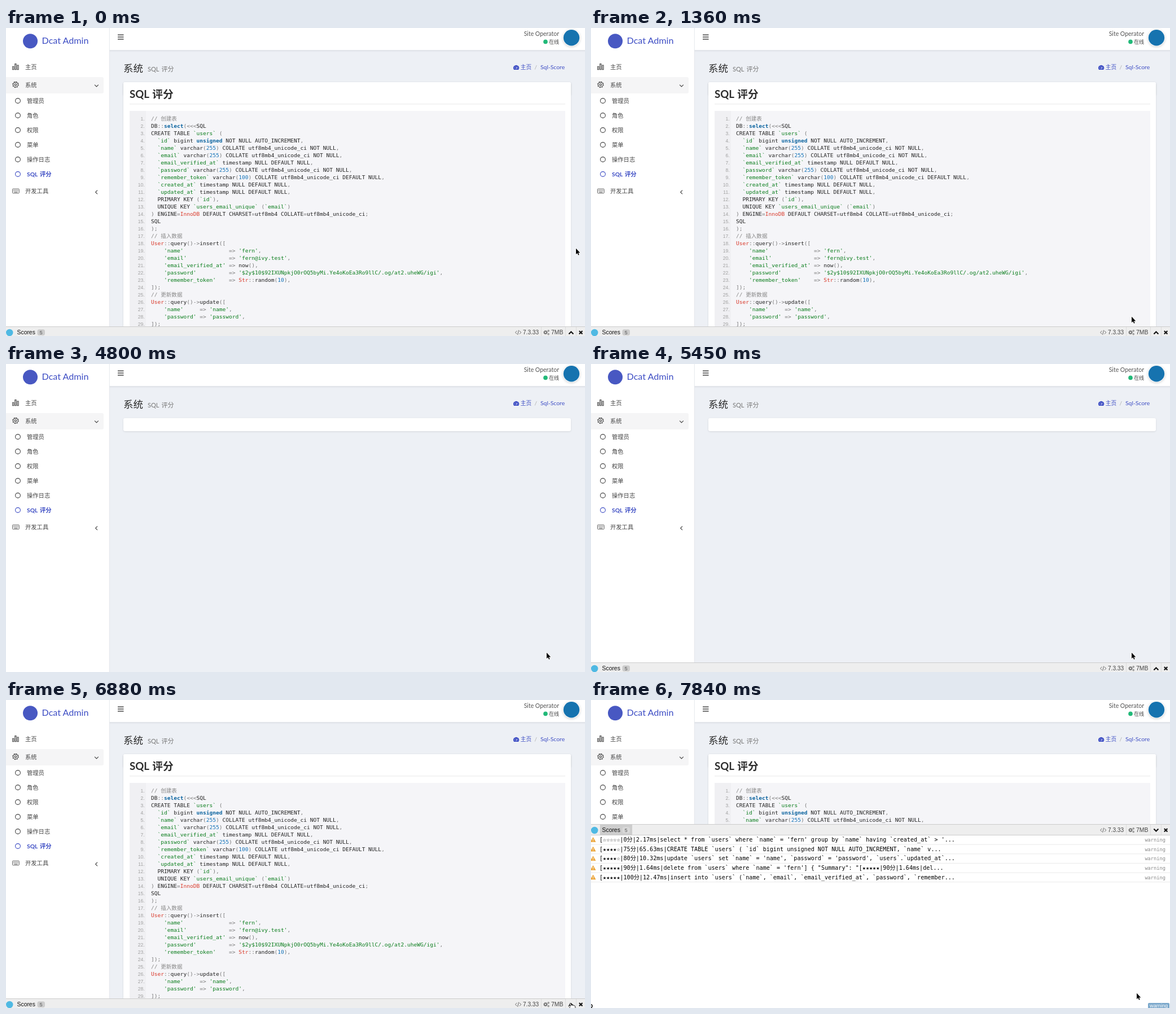
An HTML page for the animation above (8 s loop, 1026 by 546 pixels).

```html
<!DOCTYPE html>
<html lang="zh">
<head>
<meta charset="utf-8">
<title>SQL 评分</title>
<style>
html, body { margin: 0; width: 100%; height: 100%; overflow: hidden; background: #edf0f5; }
svg { display: block; width: 1026px; height: 546px; }
svg { font-family: Lato, "Noto Sans CJK SC", "Noto Sans CJK JP", "Noto Sans CJK", sans-serif; fill: #444; }
text { white-space: pre; }
.mono { font-family: "DejaVu Sans Mono", "Noto Sans CJK SC", "Noto Sans CJK JP", monospace; }
.sans { font-family: "Liberation Sans", "Noto Sans CJK SC", sans-serif; }
.line { fill: none; stroke: #444; stroke-width: 1.1; }
.faint .line, .faint.line { stroke: #666; stroke-width: 1; }
.brand { fill: #3d4dc4; }
.card { fill: #fff; filter: drop-shadow(0 1px 1.5px #0000001a); }
.avatar { fill: #fff; filter: drop-shadow(0 1px 2px #0003); }

.com { fill: #888; } .str { fill: #0a7d1c; } .num { fill: #1272b8; }
.kwd { fill: #0a639f; font-weight: bold; } .typ { fill: #d93a2b; } .pun { fill: #777; }

.icons, .content, .bar, .opened, .closed, .slide, .arrow, .hand { animation: 8s step-end infinite; }
.icons { animation-name: icons; }
.content { animation-name: content; }
.bar { animation-name: bar; }
.slide { animation-name: slide; }
.opened { animation-name: opened; }
.closed { animation-name: closed; }
.arrow { animation-name: arrow; }
.hand { animation-name: hand; }

@keyframes icons { 0%, 60%, 100% { visibility: visible } 53.5% { visibility: hidden } }
@keyframes bar { 0%, 68.125%, 100% { visibility: visible } 53.5% { visibility: hidden } }
@keyframes content { 0%, 75.625%, 100% { visibility: visible } 53.5% { visibility: hidden } }
@keyframes slide { 0% { transform: none } 95.75%, 100% { transform: translateY(-309px) } }
@keyframes opened { 0% { opacity: 0 } 95.75%, 100% { opacity: 1 } }
@keyframes closed { 0% { opacity: 1 } 95.75%, 100% { opacity: 0 } }
@keyframes hand { 0%, 98%, 100% { opacity: 0 } 86% { opacity: 1 } }
@keyframes arrow {
  0% { transform: translate(1009px, 390px) }
  2.25% { transform: translate(975px, 414px) }
  5.625% { transform: translate(946px, 470px) }
  8.125% { transform: translate(941px, 494px) }
  13.75% { transform: translate(950px, 504px) }
  17% { transform: translate(957px, 511px) }
  81.125% { transform: translate(998px, 535px) }
  86% { transform: translate(998px, 600px) }
  98%, 100% { transform: translate(966px, 519px) }
}
</style>
</head>
<body>
<svg viewBox="0 0 1026 546">
  <defs>
    <linearGradient id="shade" x2="0" y2="1"><stop stop-color="#0001"/><stop offset="1" stop-color="#0000"/></linearGradient>
  </defs>

  <!-- header -->
  <rect width="1026" height="546" fill="#edf0f5"/>
  <rect x="183" y="39" width="843" height="4" fill="url(#shade)"/>
  <rect x="183" width="843" height="39" fill="#fff"/>
  <path class="line" style="stroke-width:1.5" d="M198 12.3h10.5M198 16h10.5M198 19.7h10.5"/>
  <text x="980" y="14.2" font-size="10.5" text-anchor="end" fill="#555">Site Operator</text>
  <circle cx="956" cy="24.4" r="3.8" fill="#21b978"/>
  <text x="962" y="27.7" font-size="9.1">在线</text>
  <circle class="avatar" cx="1002" cy="17.3" r="15"/>
  <circle class="icons" cx="1002" cy="17.3" r="14.2" fill="#1673af"/>

  <!-- sidebar -->
  <rect width="183" height="546" fill="#fff"/>
  <path d="M183.3 0v546" stroke="#e2e5ea" stroke-width=".9"/>
  <path d="M0 87h170a3 3 0 0 1 3 3v23a3 3 0 0 1-3 3H0z" fill="#f5f5f6"/>
  <text class="brand" x="63.5" y="28" font-size="16.1">Dcat Admin</text>
  <g id="menu" font-size="10.3"></g>
  <path class="line" d="M157 100.6l3.4 3.4 3.4-3.4M162 287.6l-3.4 3.4 3.4 3.4"/>
  <g class="faint">
    <rect class="line" x="11.5" y="285.2" width="11.8" height="7.6" rx="1"/>
    <path class="line" stroke-dasharray="1.2 .7" d="M13 287.4h9M13 289.2h9"/>
    <path class="line" d="M14.4 291.1h6"/>
  </g>
  <g class="icons">
    <circle cx="43" cy="23.2" r="13" fill="#4858c2"/>
    <path class="line" d="M11.7 68.3h2.2v5.4h-2.2zM15.8 63.6h2.2v10.1h-2.2zM19.9 66h2.2v7.7h-2.2z"/>
    <circle class="line" cx="17" cy="100.4" r="4.3"/>
    <circle class="line" cx="17" cy="100.4" r="5.2" stroke-dasharray="2 2.08"/>
    <circle class="line" cx="17" cy="100.4" r="1.7"/>
    <g id="rings"></g>
  </g>

  <!-- page heading -->
  <text x="208" y="77.8" font-size="17.5" fill="#2a2a2a">系统</text>
  <text x="251" y="77.2" font-size="11" fill="#777" word-spacing="1.5">SQL 评分</text>
  <path class="brand" d="M900.2 74a5 5 0 1 1 7.8 0z"/>
  <path d="M904 72.6l1.4-4M900.8 71h1M906.4 71h1M902 68.2l.6.6" stroke="#edf0f5"/>
  <text class="brand" x="911.8" y="73.4" font-size="9.7">主页</text>
  <text x="936.5" y="73.4" font-size="10" fill="#aaa">/</text>
  <text class="brand" x="947" y="73.4" font-size="10.4">Sql-Score</text>

  <!-- card -->
  <rect class="card" x="208" y="96" width="793" height="23" rx="3"/>
  <g class="content">
    <rect class="card" x="208" y="96" width="793" height="470" rx="3"/>
    <text x="219" y="124" font-size="18.6" font-weight="bold" fill="#2d2d2d" word-spacing="1.5">SQL 评分</text>
    <path d="M219 134.8h772" stroke="#e8e8e8"/>
    <rect x="219" y="147" width="772" height="400" fill="#f5f5f8"/>
    <rect x="219" y="147" width="29" height="400" fill="#f0f0f3"/>
    <g id="code" class="mono" font-size="9.55"></g>
  </g>

  <!-- debug bar with its panel, which lies below the stage while closed -->
  <g class="bar"><g class="slide sans" font-size="10.1">
    <rect y="529" width="1026" height="20" fill="#eee"/>
    <path d="M0 529.5h1026M0 548.5h1026" stroke="#ccc"/>
    <rect class="opened" x="16" y="530" width="57" height="18" fill="#cdcdcd"/>
    <circle cx="6.3" cy="540" r="6.2" fill="#4fb9e3"/>
    <text x="19.5" y="543.2" font-size="10.4" fill="#111">Scores</text>
    <rect class="closed" x="55.5" y="534.3" width="13.5" height="10.8" rx="3.5" fill="#ccc"/>
    <rect class="opened" x="55.5" y="534.3" width="13.5" height="10.8" rx="3.5" fill="#d8d8d8"/>
    <text x="59.8" y="543" font-size="8.6" fill="#555">5</text>
    <path d="M948.5 530v18M991.5 530v18M1010.5 530v18" stroke="#ddd"/>
    <path class="line faint" d="M905.4 536.8l-2.8 2.9 2.8 2.9M909.9 536.8l2.8 2.9-2.8 2.9M908.6 535.6l-1.9 8.2"/>
    <text x="916" y="543.2">7.3.33</text>
    <g class="line faint">
      <circle cx="956" cy="539.6" r="2.1" style="stroke-width:1.5"/>
      <circle cx="956" cy="539.6" r="3.3" stroke-dasharray="1.3 1.3"/>
      <circle cx="961.2" cy="536.8" r="1.2"/><circle cx="961.2" cy="542.6" r="1.2"/>
    </g>
    <text x="966" y="543.2" font-size="10.4">7MB</text>
    <g fill="none" stroke="#111" stroke-width="2.1">
      <path class="closed" d="M997.4 542.4l4-4 4 4"/>
      <path class="opened" d="M997.4 537.6l4 4 4-4"/>
      <path d="M1015.8 537l5.6 5.6M1021.4 537l-5.6 5.6"/>
    </g>
    <rect y="549" width="1026" height="310" fill="#fff"/>
    <g id="rows" class="mono"></g>
    <circle cx="-.4" cy="851.6" r="2.7" fill="none" stroke="#111" stroke-width="1.4"/>
    <rect x="987" y="846" width="38" height="12" rx="2" fill="#7ca9cc"/>
    <text x="990" y="854.3" font-size="9.2" fill="#fff">warning</text>
  </g></g>

  <!-- pointers -->
  <path class="arrow" d="M1 .8v10.4l2.4-2.2 1.7 3.7 1.6-.7-1.7-3.6h3.3z" fill="#000" stroke="#fff" stroke-width="1.5" paint-order="stroke"/>
  <path class="hand" d="M1000.4 548v-1.5l-3.3-3.6c-.8-1.2.8-2 1.8-1.1l1.5 1.3-1.3-4.4c-.3-1.4 1.4-1.8 1.9-.5l1.2 3.2c.3-1 1.7-1 2 0 .5-.8 1.8-.6 2 .3.7-.6 1.8-.2 2 .7l.6 3v2.6z" fill="#fff" stroke="#111" stroke-width=".9"/>
</svg>

<script type="text/plain" id="listing">
// 创建表
DB::select(<<<SQL
CREATE TABLE `users` (
  `id` bigint unsigned NOT NULL AUTO_INCREMENT,
  `name` varchar(255) COLLATE utf8mb4_unicode_ci NOT NULL,
  `email` varchar(255) COLLATE utf8mb4_unicode_ci NOT NULL,
  `email_verified_at` timestamp NULL DEFAULT NULL,
  `password` varchar(255) COLLATE utf8mb4_unicode_ci NOT NULL,
  `remember_token` varchar(100) COLLATE utf8mb4_unicode_ci DEFAULT NULL,
  `created_at` timestamp NULL DEFAULT NULL,
  `updated_at` timestamp NULL DEFAULT NULL,
  PRIMARY KEY (`id`),
  UNIQUE KEY `users_email_unique` (`email`)
) ENGINE=InnoDB DEFAULT CHARSET=utf8mb4 COLLATE=utf8mb4_unicode_ci;
SQL
);
// 插入数据
User::query()->insert([
    'name'              => 'fern',
    'email'             => 'fern@ivy.test',
    'email_verified_at' => now(),
    'password'          => '$2y$10$92IXUNpkjO0rOQ5byMi.Ye4oKoEa3Ro9llC/.og/at2.uheWG/igi',
    'remember_token'    => Str::random(10),
]);
// 更新数据
User::query()->update([
    'name'     => 'name',
    'password' => 'password',
]);
</script>
<script type="text/plain" id="messages">
[☆☆☆☆☆|0分|2.17ms|select * from `users` where `name` = 'fern' group by `name` having `created_at` > '...
[★★★★☆|75分|65.63ms|CREATE TABLE `users` ( `id` bigint unsigned NOT NULL AUTO_INCREMENT, `name` v...
[★★★★☆|80分|10.32ms|update `users` set `name` = 'name', `password` = 'password', `users`.`updated_at`...
[★★★★★|90分|1.64ms|delete from `users` where `name` = 'fern'] { "Summary": "[★★★★★|90分|1.64ms|del...
[★★★★★|100分|12.47ms|insert into `users` (`name`, `email`, `email_verified_at`, `password`, `remember...
</script>
<script>
const byId = id => document.getElementById(id);
const linesOf = id => byId(id).textContent.trim().split('\n');

function add(parent, tag, attrs, text = '') {
  const node = document.createElementNS('http://www.w3.org/2000/svg', tag);
  for (const key in attrs) node.setAttribute(key, attrs[key]);
  node.textContent = text;
  return parent.appendChild(node);
}

// Sidebar
const menu = byId('menu');
for (const [label, y] of [['主页', 69], ['系统', 101], ['开发工具', 289]])
  add(menu, 'text', { x: 34, y: y + 4 }, label);
['管理员', '角色', '权限', '菜单', '操作日志', 'SQL 评分'].forEach((label, i, all) => {
  const y = 129 + 26 * i, active = i === all.length - 1;
  add(menu, 'text', {
    x: 37, y: y + 4,
    style: active ? 'fill:#3d4dc4;font-weight:bold;word-spacing:1.5px' : ''
  }, label);
  add(byId('rings'), 'circle', {
    class: 'line', cx: 21, cy: y, r: 4.4,
    style: active ? 'stroke:#3d4dc4' : ''
  });
});

// Highlighted listing
const token = /(?<com>\/\/.*)|(?<str>'[^']*'|`[^`]*`)|(?<num>\b\d+\b)|(?<kwd>\b(?:select|unsigned)\b)|(?<typ>\b(?:User|Str|InnoDB)\b)|(?<pun>[^\w\s'`]+)/g;

linesOf('listing').forEach((line, i) => {
  const y = 163.5 + 13 * i;
  add(byId('code'), 'text', {
    x: 245.5, y, 'text-anchor': 'end', 'font-size': 8.5, class: 'sans', fill: '#a0a0a0'
  }, i + 1 + '.');
  const row = add(byId('code'), 'text', { x: 257, y, fill: '#222' });
  let end = 0;
  for (const match of line.matchAll(token)) {
    const kind = Object.keys(match.groups).find(key => match.groups[key]);
    add(row, 'tspan', {}, line.slice(end, match.index));
    add(row, 'tspan', { class: kind }, match[0]);
    end = match.index + match[0].length;
  }
  add(row, 'tspan', {}, line.slice(end));
});

// Messages in the panel
linesOf('messages').forEach((line, i) => {
  const rows = byId('rows'), y = 556.5 + 16.65 * i;
  add(rows, 'path', { d: `M0 ${y + 8.6}h1026`, stroke: '#e9e9e9' });
  add(rows, 'path', { d: `M3.7 ${y - 4}l4.5 8h-9z`, fill: '#eba53a', stroke: '#eba53a', 'stroke-width': .6, 'stroke-linejoin': 'round' });
  add(rows, 'path', { d: `M3.7 ${y - 1.4}v2.8m0 .8v1`, stroke: '#fff' });
  add(rows, 'text', { x: 15, y: y + 3.6, fill: '#000' }, line);
  add(rows, 'text', { x: 1018, y: y + 3.6, 'text-anchor': 'end', 'font-size': 8.7, fill: '#888' }, 'warning');
});
</script>
</body>
</html>
```
